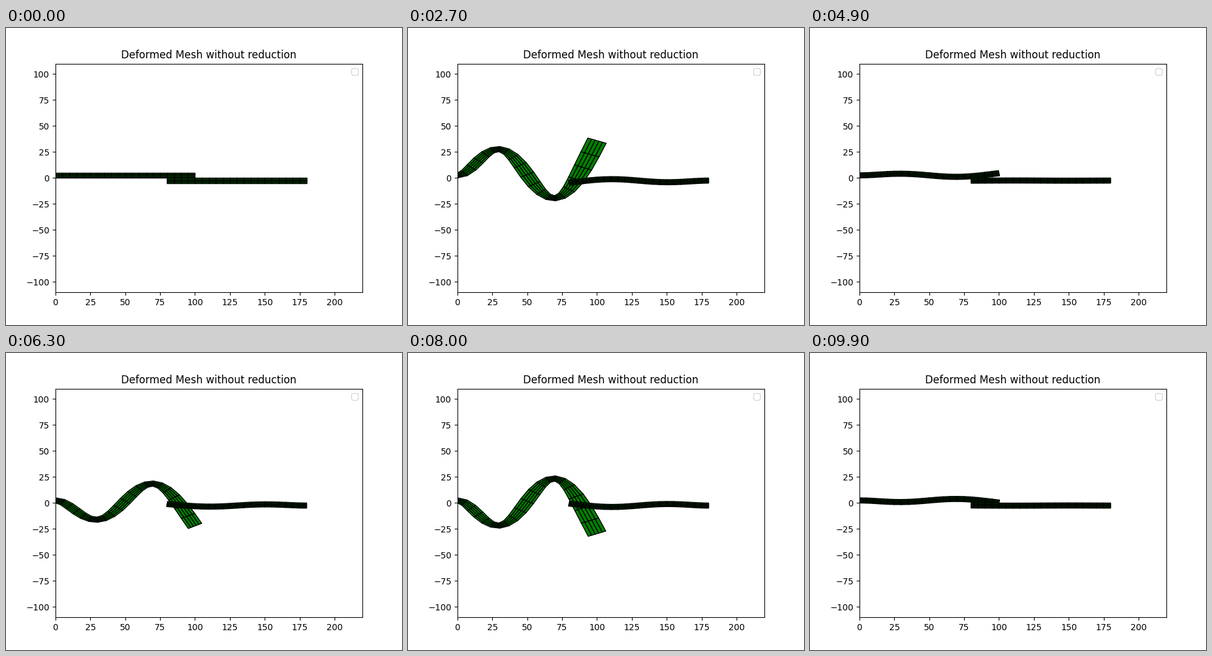
Animation, 640 px wide and 480 px high, one loop 10000 ms. Source, as a matplotlib script:

```python
import numpy as np
import matplotlib.pyplot as plt
from matplotlib.animation import FuncAnimation
from matplotlib.collections import PolyCollection

FRAMES, INTERVAL = 100, 100
LENGTH, HEIGHT = 100.0, 5.0
NX, NY = 20, 5
BETA, SIGMA = 7.854757, 0.999224  # third bending mode of a cantilever


def mode(s):
    """Deflection (1 at the free end) and its slope at s in 0..1."""
    z = BETA * s
    w = np.cosh(z) - np.cos(z) - SIGMA * (np.sinh(z) - np.sin(z))
    dw = BETA * (np.sinh(z) + np.sin(z) - SIGMA * (np.cosh(z) - np.cos(z)))
    return w / 2, dw / 2


class Beam:
    def __init__(self, ax, x0, y0, tip, clamp_right=False):
        self.x, self.y = np.meshgrid(np.linspace(x0, x0 + LENGTH, NX + 1),
                                     np.linspace(y0, y0 + HEIGHT, NY + 1))
        s = (self.x - x0) / LENGTH
        w, dw = mode(1 - s if clamp_right else s)
        slope = (-dw if clamp_right else dw) / LENGTH
        self.uy = tip * w
        self.ux = -tip * slope * (self.y - y0 - HEIGHT / 2)
        self.cells = PolyCollection([], facecolor="green", edgecolor="black",
                                    linewidth=1, zorder=1)
        ax.add_collection(self.cells, autolim=False)

    def deform(self, q):
        p = np.dstack([self.x + q * self.ux, self.y + q * self.uy])
        quads = np.stack([p[:-1, :-1], p[:-1, 1:], p[1:, 1:], p[1:, :-1]], axis=2)
        self.cells.set_verts(quads.reshape(-1, 4, 2))


fig, ax = plt.subplots(figsize=(6.4, 4.8), dpi=100)
ax.set_xlim(0, 220)
ax.set_ylim(-110, 110)
ax.set_title("Deformed Mesh without reduction")
ax.legend([], [], loc="upper right")

beams = [Beam(ax, 0, 0, 33.7),
         Beam(ax, 80, -HEIGHT, -2.1, clamp_right=True)]


def update(i):
    q = np.sin(2 * np.pi * i / FRAMES)
    for beam in beams:
        beam.deform(q)
    return [beam.cells for beam in beams]


anim = FuncAnimation(fig, update, frames=FRAMES, interval=INTERVAL,
                     repeat=True, repeat_delay=0)
plt.show()
```
